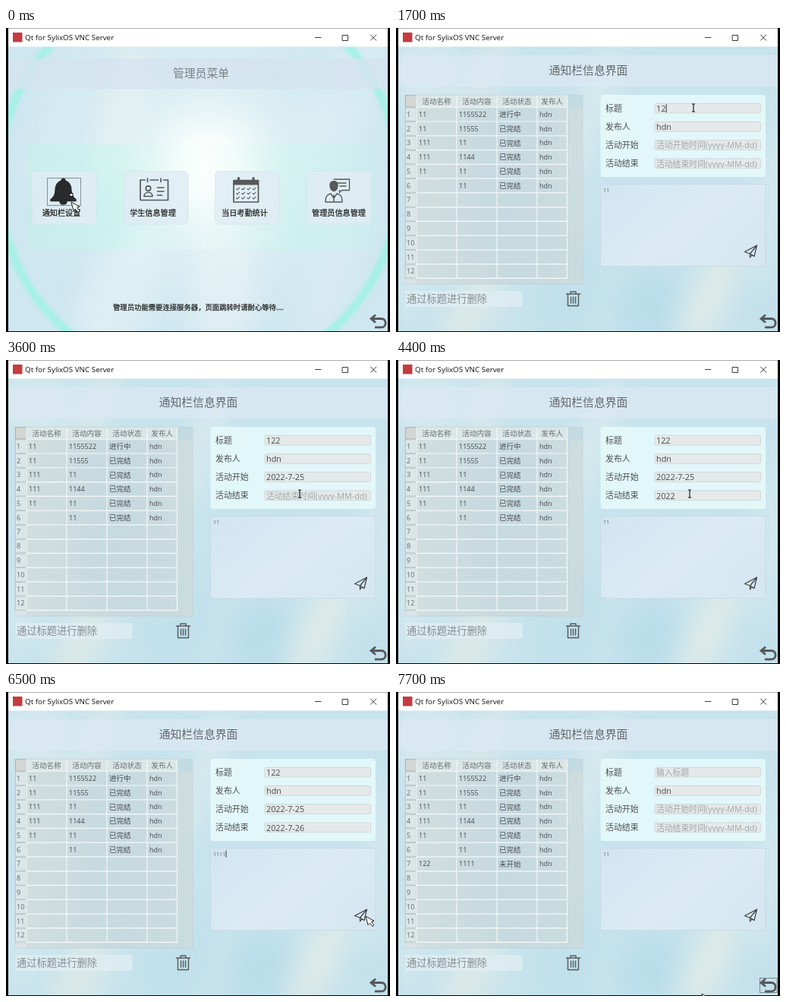
An HTML page for the animation above (7.8 s loop, 506 by 400 pixels).

```html
<!DOCTYPE html>
<html lang="zh-CN">
<head>
<meta charset="utf-8">
<title>通知栏信息界面</title>
<style>
  html, body { margin: 0; width: 100%; height: 100%; overflow: hidden; background: #000; }
  svg { display: block; width: 506px; height: 400px; }
  text { font-family: "Open Sans", "Noto Sans CJK SC", "Noto Sans CJK", sans-serif; white-space: pre; }
  .icon { fill: none; stroke: #55595b; stroke-width: 1.4; stroke-linejoin: round; stroke-linecap: round; }
  .dots { fill: none; stroke: #333; stroke-width: 1; stroke-dasharray: 1 1; }
  .firm { stroke: #222; stroke-width: .25; }
</style>
</head>
<body>
<svg id="stage" viewBox="0 0 506 400" xmlns="http://www.w3.org/2000/svg">
  <defs>
    <filter id="soft" x="-60%" y="-60%" width="220%" height="220%"><feGaussianBlur stdDeviation="16"/></filter>
    <filter id="ring" x="-10%" y="-10%" width="120%" height="120%"><feGaussianBlur stdDeviation="2.2"/></filter>
    <radialGradient id="glow" gradientUnits="userSpaceOnUse" cx="266" cy="184" r="240">
      <stop offset="0" stop-color="#fff"/>
      <stop offset=".16" stop-color="#fdfffe" stop-opacity=".92"/>
      <stop offset=".42" stop-color="#e8f6f6" stop-opacity=".6"/>
      <stop offset="1" stop-color="#d6ecf3" stop-opacity="0"/>
    </radialGradient>
    <linearGradient id="mint">
      <stop offset="0" stop-color="#c4f0ea" stop-opacity=".5"/>
      <stop offset=".25" stop-color="#c6f7ec" stop-opacity=".5"/>
      <stop offset=".5" stop-color="#f0fdf9" stop-opacity=".25"/>
      <stop offset=".75" stop-color="#c8f6ec" stop-opacity=".45"/>
      <stop offset="1" stop-color="#c8efee" stop-opacity=".45"/>
    </linearGradient>
    <linearGradient id="tint">
      <stop offset="0" stop-color="#d5dddb"/>
      <stop offset=".55" stop-color="#c6d8dd"/>
      <stop offset="1" stop-color="#cedbdb"/>
    </linearGradient>
    <linearGradient id="pad" x2="1" y2=".6">
      <stop offset="0" stop-color="#d3e6f1"/>
      <stop offset=".6" stop-color="#dfecf7"/>
      <stop offset="1" stop-color="#d8e8f2"/>
    </linearGradient>
    <clipPath id="view"><rect x="3" y="24" width="500" height="375"/></clipPath>
  </defs>
  <rect width="506" height="400" fill="#000"/>
  <g clip-path="url(#view)">
    <g id="menu"></g>
    <g id="form"></g>
    <g id="back"></g>
  </g>
  <g id="bar"></g>
  <g id="arrow">
    <path d="M0 0L3 11.5 5.4 9 8.8 13.4 11 11.6 7.6 7.4 11 6.2Z" fill="#fff" stroke="#222" stroke-width="1"/>
  </g>
  <path id="beam" d="M-2-5h1.4q.6 0 .6.6 0-.6.6-.6H2M0-4.5v9M-2 5h1.4q.6 0 .6-.6 0 .6.6.6H2" fill="none" stroke="#111" stroke-width="1.1"/>
</svg>
<script>
const $ = id => document.getElementById(id);
const LOOP = 7800, STEP = 100;

function add(parent, tag, attrs, text) {
  const el = document.createElementNS('http://www.w3.org/2000/svg', tag);
  for (const k in attrs) el.setAttribute(k, attrs[k]);
  if (text !== undefined) el.textContent = text;
  parent.appendChild(el);
  return el;
}
const box = (p, x, y, width, height, fill, more) => add(p, 'rect', { x, y, width, height, fill, ...more });
const path = (p, d, more) => add(p, 'path', { d, class: 'icon', ...more });
const label = (p, s, x, mid, size, fill, more) =>
  add(p, 'text', { x, y: mid + size * .37, 'font-size': size, fill, ...more }, s);
const centred = { 'text-anchor': 'middle' };
const show = (el, on) => el.setAttribute('visibility', on ? 'visible' : 'hidden');

function streaks(p, list) {
  for (const [x, y, rx, ry, turn, fill, opacity] of list)
    add(p, 'ellipse', { rx, ry, fill, opacity, filter: 'url(#soft)', transform: `translate(${x} ${y}) rotate(${turn})` });
}

// Window title
const bar = $('bar');
box(bar, 3, 0, 500, 24.5, '#fff');
box(bar, 3, 0, 500, .7, '#8a8a8a');
box(bar, 9, 6, 12.5, 12.5, '#c43c40');
label(bar, 'Qt for SylixOS VNC Server', 25, 12.3, 9.85, '#111');
path(bar, 'M407.500 12.500h7.500M443.500 9.500h7v7h-7zM480.500 9l7.300 7.300M487.800 9l-7.300 7.300',
  { style: 'stroke:#222;stroke-width:.9;stroke-linejoin:miter' });

// Menu page
const menu = $('menu');
box(menu, 3, 24, 500, 376, '#cfe7f0');
streaks(menu, [
  [150, 110, 32, 110, 12, '#e6efee', .75],
  [70, 120, 25, 110, 20, '#d7ebf3', .8],
  [150, 350, 45, 90, 25, '#e2f1f4', .8],
  [285, 340, 45, 90, 0, '#e6f1f4', .8],
  [430, 330, 30, 110, 20, '#d9eaf2', .8],
  [440, 110, 40, 120, 25, '#dcedf4', .7]
]);
box(menu, 3, 24, 500, 376, 'url(#glow)');
add(menu, 'circle', { cx: 254, cy: 200, r: 264, fill: 'none', stroke: '#a6f1e6', 'stroke-width': 11, filter: 'url(#ring)' });
box(menu, 3, 40, 500, 40, '#d6e5f1', { opacity: .82 });
label(menu, '管理员菜单', 257, 60, 14.8, '#7b8084', centred);
box(menu, 28, 153, 460, 138, 'url(#mint)', { rx: 3 });
[['通知栏设置', 34, 73], ['学生信息管理', 155, 193.5], ['当日考勤统计', 275.5, 314.5], ['管理员信息管理', 396.5, 438.5]]
  .forEach(([s, x, mid]) => {
    box(menu, x, 188.5, 85, 69.5, '#e0edf4', { rx: 5, opacity: .85, stroke: '#d3e4ea', 'stroke-width': .8 });
    label(menu, s, mid, 243, 10.15, '#222', { ...centred, class: 'firm' });
  });
label(menu, '管理员功能需要连接服务器，页面跳转时请耐心等待....', 141, 368, 9.35, '#222', { class: 'firm' });

path(menu, 'M75.500 198.500c1.500 0 2.500 1 2.500 2.500 6 2 8 7 8 13 0 6 2 9 6 11.500v2H59v-2c4-2.500 6-5.500 6-11.500 0-6 2-11 8-13 0-1.500 1-2.500 2.500-2.500zM71 229h9c-1 4-8 4-9 0z',
  { style: 'fill:#292b2c;stroke:#292b2c' });
box(menu, 54.5, 197.5, 44, 36, 'none', { class: 'dots' });
box(menu, 84, 217.5, 4, 4, '#fff', { stroke: '#111', 'stroke-width': 1 });

path(menu, 'M183 200h-6v26.500h36.500v-26.500h-6M190 200h10.500M186.500 198v4.500M204 198v4.500M182 221.500c0-7 11-7 11 0zM199.500 210h8.500M199.500 215h8.500M199.500 220h6',
  { style: 'stroke-width:1.7' });
add(menu, 'circle', { cx: 187.5, cy: 211, r: 3.2, class: 'icon', style: 'stroke-width:1.7' });

path(menu, 'M300 200.500h32.500v28.500h-32.500z', { style: 'stroke-width:1.7' });
box(menu, 299.5, 200, 33.5, 6.5, '#55595b');
path(menu, 'M306.500 197.500v4M326 197.500v4', { style: 'stroke-width:3.2' });
for (let i = 0; i < 12; i++) {
  const x = 303.5 + i % 4 * 7.2, y = 211.5 + Math.floor(i / 4) * 6;
  path(menu, `M${x} ${y}l1.300 1.400 2.700-2.700`, { style: 'stroke-width:1.1' });
}

path(menu, 'M432 199h20.500v14.500h-10l-3 3v-3M437 204h11M440 208h8', { style: 'stroke-width:1.3' });
path(menu, 'M427 206.500c0-6.500 10-6.500 10 0 0 4.500-2 8-5 8s-5-3.500-5-8z', { style: 'fill:#55595b' });
path(menu, 'M421 229c0-8 2.500-10 7-11l4 6 4-6c4.500 1 7 3 7 11zM432 220v8', { style: 'stroke-width:1.4' });

// Notice page
const form = $('form');
box(form, 3, 24, 500, 376, '#c7e3ed');
streaks(form, [
  [40, 60, 50, 50, 30, '#d8eaee', .8],
  [120, 60, 18, 60, 20, '#e4ede8', .7],
  [100, 370, 30, 65, 30, '#dfebe6', .8],
  [20, 330, 25, 60, 10, '#d3e9ee', .8],
  [225, 345, 40, 70, 15, '#bfe0eb', .8],
  [335, 365, 40, 50, 20, '#b8dcea', .8],
  [415, 350, 24, 80, 25, '#e3ede6', .8],
  [258, 110, 24, 100, 20, '#dcecee', .7],
  [490, 230, 22, 110, 10, '#d6e9ee', .8],
  [485, 375, 25, 30, 0, '#c2e0ea', .8]
]);
box(form, 3, 36, 500, 41, '#dbe9f3', { opacity: .75 });
label(form, '通知栏信息界面', 253.5, 55.7, 14.8, '#63676b', centred);

const cols = [27, 80, 133, 186, 225.5], top0 = 104.3, rowH = 18.76;
box(form, 12, 88, 234, 249, 'url(#tint)', { opacity: .8, stroke: '#c3ced2', 'stroke-width': .8 });
box(form, 226, 88.5, 19.5, 15.8, '#b9dae4', { opacity: .6 });
box(form, 12, 88.5, 213.5, 15.8, '#e2eaea', { opacity: .7 });
const hot = box(form, 80, top0 + 6 * rowH, 53, rowH, '#b0b1b2');
box(form, 12.5, 88.7, 14, 15.2, '#d3d6d3', { stroke: '#aeb4b4', 'stroke-width': 1 });
box(form, 12, 331, 15, 5.5, '#dfeaed', { opacity: .6 });
['活动名称', '活动内容', '活动状态', '发布人'].forEach((s, i) =>
  label(form, s, (cols[i] + cols[i + 1]) / 2, 96.3, 9.6, '#6a6f72', centred));
for (let i = 0; i < 12; i++) {
  const y = top0 + i * rowH;
  box(form, 12.5, y + .5, 14, rowH - 1, '#dce7ea', { stroke: '#b5c0c4', 'stroke-width': .8, opacity: .9 });
  label(form, i + 1, 14, y + 9.3, 9, '#62676a');
}
let lines = '';
for (let i = 0; i <= 12; i++) lines += `M27 ${top0 + i * rowH}H225.500`;
for (const x of cols) lines += `M${x} 89V${top0 + 12 * rowH}`;
path(form, lines, { style: 'stroke:#f4f9fa;stroke-width:1.1' });

function record(p, i, cells) {
  cells.forEach((s, c) => label(p, s, cols[c] + 3, top0 + i * rowH + 9.3, c === 2 ? 9.5 : 9, '#45494c'));
}
const user = 'hdn', done = '已完结';
[['11', '1155522', '进行中'], ['11', '11555', done], ['111', '11', done], ['111', '1144', done], ['11', '11', done], ['', '11', done]]
  .forEach((cells, i) => record(form, i, [...cells, user]));
const fresh = add(form, 'g', {});
record(fresh, 6, ['122', '1111', '未开始', user]);

box(form, 12.5, 346, 154, 21, '#e1eef3', { rx: 3, opacity: .75 });
label(form, '通过标题进行删除', 14, 356.5, 13.25, '#858d92');
path(form, 'M224.500 350h18M230 350v-3h7v3M226.500 350.500v15h14v-15M230.500 354v8M233.500 354v8M236.500 354v8', { style: 'stroke-width:1.4' });

box(form, 269.5, 88, 217.5, 108, '#e6fafb', { rx: 4, opacity: .9 });
const hints = ['输入标题', '', '活动开始时间(yyyy-MM-dd)', '活动结束时间(yyyy-MM-dd)'];
const fields = ['标题', '发布人', '活动开始', '活动结束'].map((s, i) => {
  const mid = 105.6 + i * 24.2;
  label(form, s, 276, mid, 10.9, '#4a4e50');
  box(form, 341, mid - 6.3, 139.5, 12.6, '#e5e9e9', { rx: 2, stroke: '#cdd5d7', 'stroke-width': .9 });
  const clip = add(document.querySelector('defs'), 'clipPath', { id: 'clip' + i });
  box(clip, 342, mid - 6, 138, 11.8);
  return label(form, '', 343, mid + .5, 10.8, '#444', { 'clip-path': `url(#clip${i})` });
});
box(form, 269.5, 205.5, 217.5, 108, 'url(#pad)', { opacity: .88, stroke: '#c6d8e2', 'stroke-width': .8 });
const note = label(form, '11', 273, 213, 7.1, '#5b6268');
path(form, 'M459.500 294.500L475.500 286l-3.500 14.500-5.500-3.500zM475.500 286l-9 11v5l2.500-3.500', { style: 'stroke-width:1.2;stroke:#3c4246' });
const caret = box(form, 343, 100, .9, 11, '#222');

const back = $('back');
path(back, 'M482 382.500h12.500c7.500 0 7.500 11.300 0 11.300H486M487 377.500l-6 5 6 5',
  { style: 'stroke-width:2.8;stroke-linecap:butt;stroke-linejoin:miter' });
const ring = box(back, 479.5, 376.5, 22.5, 19, 'none', { class: 'dots' });

// Mouse: time, x, y
const mouse = [
  [0, 86, 229], [100, 86, 229], [200, 85, 225], [300, 84, 222], [400, 112, 206], [500, 190, 170],
  [600, 290, 128], [700, 368, 108], [800, 392, 105], [1800, 392, 105], [1900, 391, 119],
  [2000, 389, 140], [2100, 388, 152], [3300, 388, 152], [3600, 387, 176], [4900, 387, 176],
  [5000, 387, 179], [5500, 387, 179], [5600, 380, 220], [5800, 350, 285], [5900, 340, 288],
  [6200, 340, 288], [6300, 400, 293], [6500, 474, 295], [6600, 474, 295], [6700, 390, 270],
  [6800, 272, 224], [6900, 219, 170], [7000, 219, 170], [7100, 235, 200], [7200, 253, 223],
  [7300, 253, 223], [7400, 290, 262], [7500, 338, 320], [7600, 382, 374], [7700, 403, 397], [7800, 403, 397]
];
function mouseAt(t) {
  const i = Math.max(1, mouse.findIndex(m => m[0] >= t));
  const [ta, xa, ya] = mouse[i - 1], [tb, xb, yb] = mouse[i], k = (t - ta) / (tb - ta);
  return [xa + (xb - xa) * k, ya + (yb - ya) * k];
}

// Typing: text and the times at which each prefix (from empty) appears
const typing = [
  { slot: 0, text: '122', times: [900, 1600, 1700, 1800] },
  { slot: 2, text: '2022-7-25', times: [2300, 2400, 2500, 2600, 2700, 2800, 3000, 3100, 3200, 3300] },
  { slot: 3, text: '2022-7-26', times: [3700, 4000, 4000, 4100, 4200, 4500, 4800, 5100, 5300, 5400] }
];
const SENT = 7100;
const caretOff = [[1100, 1200], [1400, 1600], [3500, 3700], [3800, 4000], [4400, 4500], [4600, 4800], [5000, 5100]];

function draw(t) {
  const onMenu = t < 100, sent = t >= SENT;
  show(menu, onMenu);
  show(form, !onMenu);
  show(ring, !onMenu && (t < 900 || sent));
  fresh.style.display = sent ? '' : 'none';
  hot.style.display = t < 400 ? '' : 'none';

  const values = [null, user, null, null];
  let active = null;
  for (const { slot, text, times } of typing) {
    if (t < times[0] || sent) continue;
    values[slot] = text.slice(0, times.filter(s => s <= t).length - 1);
    active = fields[slot];
  }
  fields.forEach((el, i) => {
    const empty = values[i] === null;
    el.textContent = empty ? hints[i] : values[i];
    el.setAttribute('fill', empty ? '#a0a6a9' : '#45494c');
  });
  note.textContent = sent || t < 6100 ? '11' : t < 6200 ? '111' : '1111';
  if (t >= 6000 && !sent) active = note;

  caret.style.display = active && !caretOff.some(([a, b]) => t >= a && t < b) ? '' : 'none';
  if (active) {
    const small = active === note;
    caret.setAttribute('x', +active.getAttribute('x') + active.getComputedTextLength() + .3);
    caret.setAttribute('y', +active.getAttribute('y') - (small ? 7 : 9.8));
    caret.setAttribute('height', small ? 9 : 11);
  }

  const [x, y] = mouseAt(t);
  const inField = x > 341 && x < 480 && y > 99 && y < 186 && (y - 99.3) % 24.2 < 12.8;
  const inNote = x > 270 && x < 456 && y > 206 && y < 313;
  const text = !onMenu && (inField || inNote);
  show($('beam'), text);
  show($('arrow'), !text);
  $(text ? 'beam' : 'arrow').setAttribute('transform', `translate(${x} ${y})`);
}

const start = performance.now();
function tick() {
  const t = (performance.now() - start) % LOOP;
  draw(Math.floor(t / STEP) * STEP);
  requestAnimationFrame(tick);
}
tick();
</script>
</body>
</html>
```
